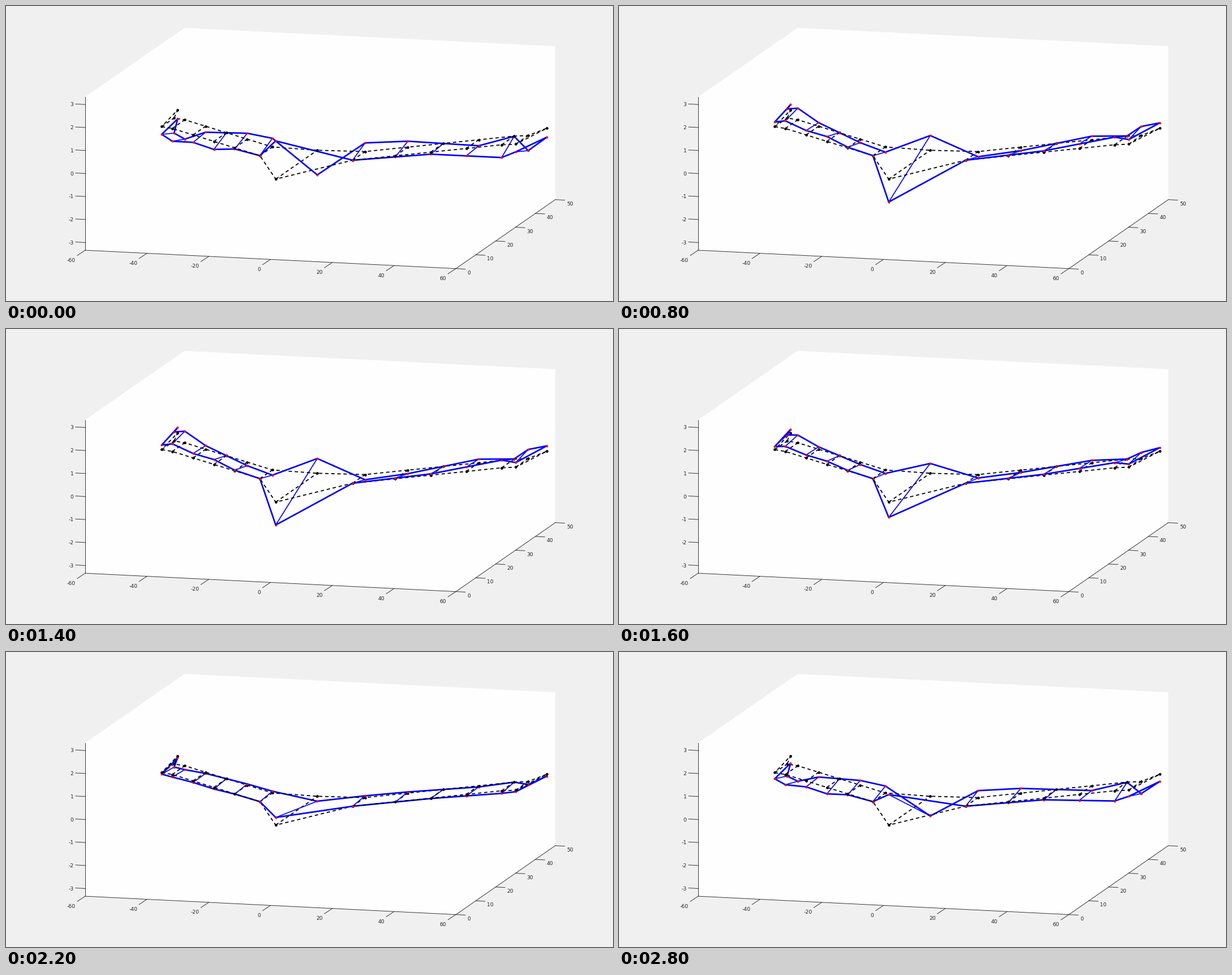
A matplotlib script that plays this animation: 1073x522 px, repeating every 3000 ms.

```python
import matplotlib.pyplot as plt
import numpy as np
from matplotlib.animation import FuncAnimation

W, H, DPI = 1073, 522, 64
PX = 72 / DPI  # points per pixel
FRAMES, INTERVAL = 15, 200
INK, BLUE = "#262626", "#0000ff"
TOP = 3.335  # height of the box above and below zero

fig = plt.figure(figsize=(W / DPI, H / DPI), dpi=DPI, facecolor="#f0f0f0")
ax = fig.add_axes([0, 0, 1, 1])
ax.set_xlim(0, W)
ax.set_ylim(H, 0)
ax.axis("off")


def project(x, y, z):
    """Orthographic view: space to stage pixels."""
    return (140 + 5.461 * (x + 60) + 3.514 * y,
            296.4 + 0.2708 * (x + 60) - 2.44 * y - 40.7 * z)


def line(xs, ys, color, width, **kw):
    return ax.plot(xs, ys, color=color, lw=width * PX, **kw)[0]


def dots(xs, ys, color, size, z):
    return ax.plot(xs, ys, "o", color=color, ms=size * PX, mew=0, zorder=z)[0]


def ruler(place, low, high, values, tick, label, align):
    """Axis from low to high; place maps a value to a point in space."""
    line(*zip(project(*place(low)), project(*place(high))), INK, 0.9, zorder=1)
    for v in values:
        x, y = project(*place(v))
        line([x, x + tick[0]], [y, y + tick[1]], INK, 0.9, zorder=1)
        ax.text(x + label[0], y + label[1], str(v), color=INK,
                family="DejaVu Sans", fontsize=9.3 * PX, ha=align,
                va="center_baseline")


corners = [(-60, 0, TOP), (-60, 50, TOP), (60, 50, TOP),
           (60, 50, -TOP), (60, 0, -TOP), (-60, 0, -TOP)]
ax.fill(*zip(*(project(*c) for c in corners)), color="#fefefe", lw=0, zorder=0)
ruler(lambda v: (-60, 0, v), -TOP, TOP, range(-3, 4),
      (-17, -0.9), (-20.5, -0.4), "right")
ruler(lambda v: (v, 0, -TOP), -60, 60, range(-60, 61, 20),
      (-14, 9.3), (-17, 17), "right")
ruler(lambda v: (60, v, -TOP), 0, 50, range(0, 51, 10),
      (16.5, 0.9), (19.8, 6.7), "left")

# Swept wing, mirrored about x = 0: ribs join the front and back edges
half = np.array([0, 15, *np.linspace(26, 53.3, 4), 57.3])
ribs = np.concatenate([-half[:0:-1], half])
span = abs(ribs)
sweep = [0, 15, 53.3, 57.3]
front = np.interp(span, sweep, [2.6, 17.95, 33.4, 34.3])
back = np.interp(span, sweep, [23.5, 24.25, 39.7, 40.55])
tip_x, tip_y, tip_swing = 59.75, 46.1, 0.39

# Height of each rib end at the top of the stroke
front_swing = np.interp(span, [0, 15, 35.1, 53.3, 57.3],
                        [-1.66, 0, 0.09, 0.555, 0.335])
back_swing = np.interp(span, [0, 15, 26, 44.2, 53.3, 57.3],
                       [1.07, -0.376, -0.256, 0.26, 0.84, 0.656])
# one rib on each side twists out of step
front_swing[3] += 0.26
back_swing[-2] -= 0.83


def outline(a, tip, b, left_tip):
    """Front edge, right tip, back edge reversed, left tip."""
    return np.concatenate([a, [tip], b[::-1], [left_tip]])


X, REST = project(outline(ribs, tip_x, ribs, -tip_x),
                  outline(front, tip_y, back, tip_y), 0)
SWING = outline(front_swing, tip_swing, back_swing, tip_swing) * 40.7
N = len(X)
EDGES = [(i, (i + 1) % N) for i in range(N)]
RUNGS = [(i, N - 2 - i) for i in range(len(ribs))]

# Rest shape, dashed
dash = dict(ls=(0, (3.3, 2.7)), dash_capstyle="butt", zorder=3)
loop = np.append(np.arange(N), 0)
line(X[loop], REST[loop], "black", 1.8, **dash)
for i, j in RUNGS:
    line(X[[i, j]], REST[[i, j]], "black", 1.8, **dash)
dots(X, REST, "black", 4.8, 6)

# Moving shape
links = [(i, j, w) for pairs, w in ((RUNGS, 1.7), (EDGES, 2.7)) for i, j in pairs]
bars = [line([], [], BLUE, w, solid_capstyle="round") for _, _, w in links]
above = dots([], [], "red", 4, 7)
below = dots([], [], "red", 4, 5)


def draw(k):
    # quick upstroke, slow downstroke
    rise = round(np.interp(k, [0, 5, 15], [-1, 1, -1]), 6) * SWING
    y = REST - rise
    for bar, (i, j, _) in zip(bars, links):
        bar.set_data(X[[i, j]], y[[i, j]])
        # parts raised over the rest shape hide it
        bar.set_zorder(4 if rise[i] + rise[j] >= 0 else 2)
    up = rise >= 0
    above.set_data(X[up], y[up])
    below.set_data(X[~up], y[~up])
    return [*bars, above, below]


anim = FuncAnimation(fig, draw, frames=FRAMES, init_func=lambda: draw(0),
                     interval=INTERVAL, repeat=True, repeat_delay=0)
plt.show()
```
